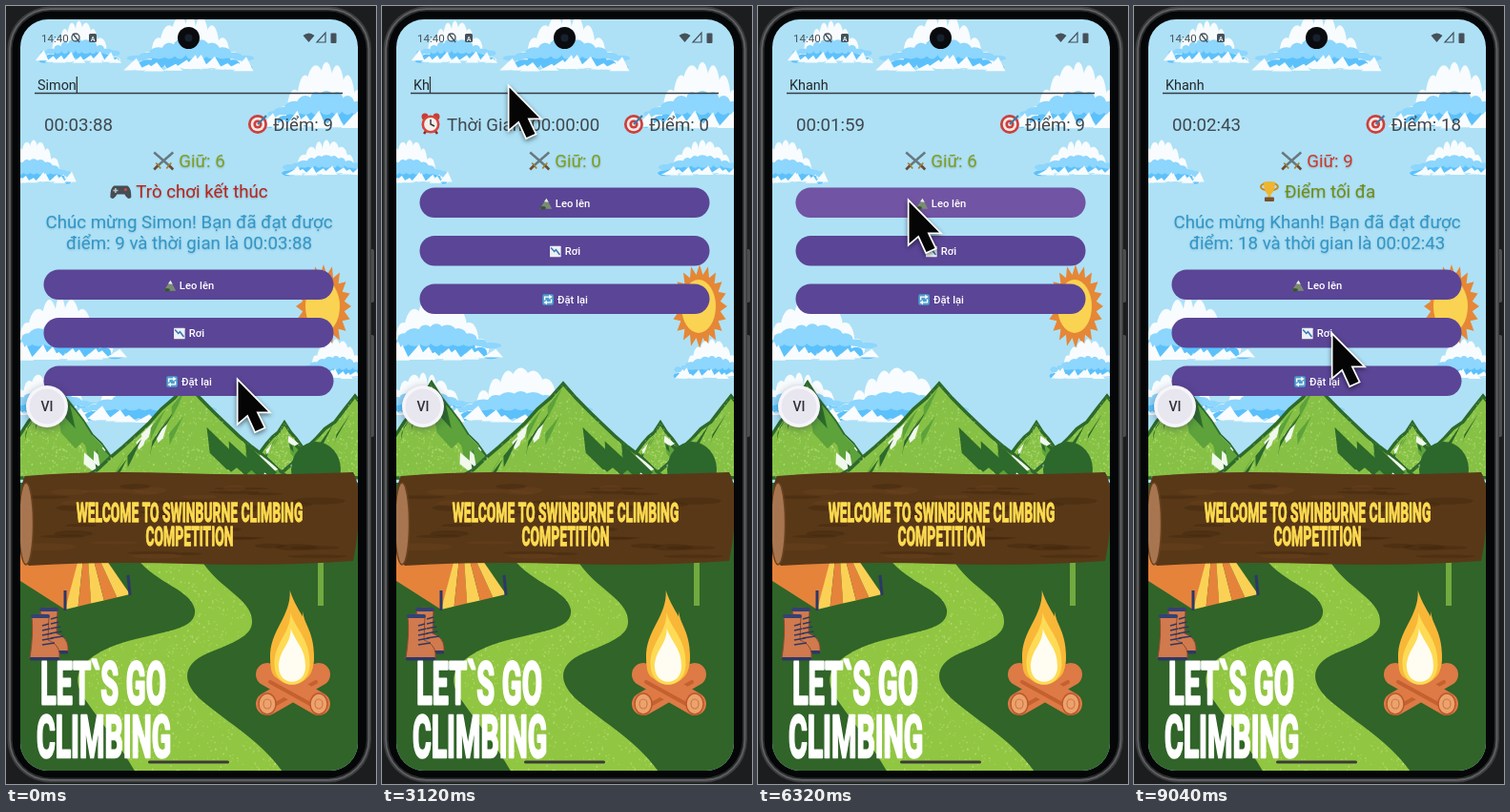
An HTML page with a canvas for the animation above (9120 ms loop, 388x816 px).

```html
<!DOCTYPE html>
<html lang="vi">
<head>
<meta charset="utf-8">
<title>Climbing score</title>
<style>
html, body { margin: 0; width: 100%; height: 100%; overflow: hidden; background: #1c1d1f; }
canvas { display: block; width: 388px; height: 816px; }
</style>
</head>
<body>
<canvas id="stage"></canvas>
<script>
const W = 388, H = 816, LOOP = 9120, STEP = 80;
const RESET = 320, START = 4720, CLICK = 305, HOLDS = 9, DONE = START + CLICK * (HOLDS - 1);
const OLIVE = '#7f9f20', BLUE = '#3294cf', RED = '#cf382c', GREY = '#40484e', PURPLE = '#5b4596';
const TYPE_FROM = 2880, TYPE_GAP = 130;
const FIRST = 'Simon', SECOND = 'Khanh';
const TAU = Math.PI * 2;
const dpr = window.devicePixelRatio || 1;
let g;

function makeLayer(canvas) {
  canvas.width = W * dpr;
  canvas.height = H * dpr;
  const ctx = canvas.getContext('2d');
  ctx.scale(dpr, dpr);
  return ctx;
}

// ---------- drawing helpers ----------
const mix = (a, b, u) => a + (b - a) * u;
function paint(path, fill, stroke, width = 2) {
  if (fill) { g.fillStyle = fill; g.fill(path); }
  if (stroke) { g.strokeStyle = stroke; g.lineWidth = width; g.stroke(path); }
  return path;
}
function trace(pts, closed) {
  const p = new Path2D();
  for (let i = 0; i < pts.length; i += 2) p.lineTo(pts[i], pts[i + 1]);
  if (closed) p.closePath();
  return p;
}
const poly = (pts, fill, stroke, width) => paint(trace(pts, true), fill, stroke, width);
const line = (pts, color, width) => paint(trace(pts), null, color, width);
const shape = (d, fill, stroke, width) => paint(new Path2D(d), fill, stroke, width);
function oval(x, y, rx, ry, fill, stroke, width) {
  const p = new Path2D();
  p.ellipse(x, y, rx, ry, 0, 0, TAU);
  paint(p, fill, stroke, width);
}
function box(x, y, w, h, r, fill) {
  const p = new Path2D();
  p.roundRect(x, y, w, h, r);
  paint(p, fill);
}
function text(s, x, y, size, color, align = 'left', weight = 400) {
  g.font = `${weight} ${size}px Roboto, sans-serif`;
  g.textAlign = align;
  g.fillStyle = color;
  g.fillText(s, x, y);
}
function glow(color, blur, dy) {
  g.shadowColor = color;
  g.shadowBlur = blur * dpr;
  g.shadowOffsetY = dy * dpr;
}
function at(x, y, scale, draw) {
  g.save();
  g.translate(x, y);
  g.scale(scale, scale);
  draw();
  g.restore();
}
function seeded(seed) {
  return () => (seed = (seed * 16807) % 2147483647) / 2147483647;
}
function chalk(path, x, y, w, h, count) {
  const rnd = seeded(91);
  g.save();
  g.clip(path);
  g.fillStyle = 'rgba(222,244,165,.38)';
  for (let i = 0; i < count; i++) g.fillRect(x + rnd() * w, y + rnd() * h, 0.6 + rnd() * 1.2, 0.6 + rnd() * 1.6);
  g.restore();
}

// ---------- scenery ----------
// A tapered dome of puffs with a blue belly and a ragged white hem.
function cloud(x, y, w, h) {
  const rnd = seeded(Math.round(x * 31 + y * 7 + 5000)), n = 11;
  const rise = u => Math.pow(Math.sin(Math.PI * u), 1.3);
  const row = (lift, size, color) => {
    for (let i = 0; i < n; i++) {
      const u = (i + .5) / n, top = h * rise(u) * size;
      oval(x + u * w, y + h * lift - top / 2, w * (.05 + .04 * rnd()), Math.max(3, top / 2), color);
    }
  };
  row(.96, .95, '#f8fcfe');
  row(.95, .5, '#5cc1fb');
  row(.78, .35, '#8dd6fd');
  for (let i = 0; i < n; i++) {
    const u = (i + rnd()) / n, px = x + u * w, py = y + h * (.93 + .07 * rnd());
    poly([px - w * .09, py, px + w * .02, py - h * (.1 + .16 * rnd()), px + w * .08, py], '#f8fcfe');
  }
}

function sun() {
  const pts = [], n = 40;
  for (let i = 0; i < n; i++) {
    const a = i * TAU / n, k = i % 2 ? 0.76 : 1;
    pts.push(333 + Math.cos(a) * 29 * k, 315 + Math.sin(a) * 44 * k);
  }
  poly(pts, '#e58736');
  oval(332, 315, 18, 28, '#fad352');
}

// Jagged slopes, then shadow, grass and snow wedges fanning down from the ridge.
function mountain(x, y, half, base, seed) {
  const rnd = seeded(seed), drop = base - y, pts = [];
  const ridge = u => y + drop * Math.pow(Math.abs(u), .92);
  for (let u = -1; u <= 1.01; u += .125) pts.push(x + u * half, ridge(u) + (Math.abs(u) > .1 ? rnd() * 5 - 2 : 0));
  const slope = poly(pts, '#86c145', '#2d6a2b', 3.5);
  chalk(slope, x - half, y, half * 2, drop, 700);
  g.save();
  g.clip(slope);
  const colors = ['#2d6a2b', '#5da23b', '#2d6a2b', '#f0f9ec'];
  for (let i = 0; i < 22; i++) {
    const u = rnd() * 1.7 - .85, snow = i % 4 === 3;
    const px = x + u * half, py = ridge(u) + rnd() * drop * .3;
    const len = drop * (snow ? .2 : .3 + .25 * rnd()), lean = Math.sign(u) * len * .6, wide = half * .07;
    poly([px, py, px + lean + wide, py + len * .75, px + lean * .8, py + len, px + lean * .4 - wide, py + len * .6], colors[i % 4]);
  }
  g.restore();
}

function ground() {
  g.fillStyle = '#306429';
  g.fillRect(15, 500, 355, 310);
  const trail = shape('M138 580C158 606 194 612 198 633C201 657 158 655 113 671C74 687 67 706 84 729C104 757 121 777 137 806H292C270 773 236 754 206 729C184 710 184 691 211 679C238 668 258 661 258 646C259 622 222 611 204 580Z', '#91c642');
  chalk(trail, 60, 580, 240, 226, 1300);
  oval(325, 486, 26, 29, '#2c672c');
  line([330, 560, 330, 629], '#71aa3e', 6);
}

function tent() {
  const n = 5, foot = u => [mix(62, 130, u), mix(633, 617, u)];
  poly([15, 570, 84, 560, 62, 633, 15, 603], '#e5833b');
  for (let i = 0; i < n; i++) poly([84, 550, ...foot(i / n), ...foot((i + 1) / n)], i % 2 ? '#e5833b' : '#fbd155');
  for (const u of [0, 1]) {
    const [x, y] = foot(u);
    line([x - 2 * u, y - 20, x, y + 1], '#2c3868', 3);
  }
}

function boot(x, y) {
  at(x, y, 1, () => {
    shape('M2 2Q10 -2 20 2L19 27Q30 31 31 41V46H0Q4 20 2 2Z', '#d07a4e', '#8f492f', 1);
    box(0, 45, 31, 3.5, 1, '#2d3865');
    box(1, 0, 20, 4, 2, '#344174');
    for (let i = 0; i < 5; i++) line([13, 12 + i * 5, 20 + i * 1.5, 10 + i * 5], '#2d3865', 1.4);
  });
}

function flame(x, base, w, h, color) {
  const X = k => x + w * k, Y = k => base - h * k;
  const p = new Path2D();
  p.moveTo(X(-.05), Y(1));
  p.bezierCurveTo(X(.12), Y(.75), X(.52), Y(.62), X(.5), Y(.28));
  p.bezierCurveTo(X(.48), Y(-.09), X(-.48), Y(-.09), X(-.5), Y(.28));
  p.bezierCurveTo(X(-.52), Y(.58), X(-.02), Y(.72), X(-.05), Y(1));
  paint(p, color);
}

function campfire() {
  for (const s of [1, -1]) {
    const x = 301 - s * 27;
    g.lineCap = 'round';
    line([x, 732, 301 + s * 27, 701], '#dd7a45', 24);
    line([x, 737, 301 + s * 24, 709], '#c4612f', 4);
    g.lineCap = 'butt';
    oval(x, 732, 9, 11, '#eda26c', '#bb572d', 1.5);
    oval(x, 732, 4, 5, null, '#c97949', 1.2);
  }
  for (const s of [1, -1]) flame(300 + s * 12, 706, 21, 62 + s * 9, '#f9b738');
  flame(300, 712, 46, 99, '#f9b738');
  flame(300, 712, 37, 76, '#fddb55');
  flame(300, 709, 28, 56, '#fffdf2');
}

// Narrow poster lettering: one fixed proportion and weight for the whole style.
function poster(s, x, y, size, color, align) {
  g.save();
  g.translate(x, y);
  g.scale(0.495, 1);
  text(s, 0, 0, size, color, align, 700);
  g.lineJoin = 'round';
  g.strokeStyle = color;
  g.lineWidth = size * .045;
  g.strokeText(s, 0, 0);
  g.restore();
}

function sign() {
  shape('M20 493Q90 487 180 490T364 489Q371 500 370 530T364 582Q280 588 190 585T24 587Q14 578 14 540T20 493Z', '#593817');
  const rnd = seeded(37);
  for (let i = 0; i < 40; i++) {
    const x = 40 + rnd() * 290, y = 498 + rnd() * 80;
    oval(x, y, 12 + rnd() * 22, 1 + rnd() * 3, i % 3 ? 'rgba(62,35,12,.4)' : 'rgba(112,72,34,.3)');
  }
  oval(21, 543, 7.5, 43, '#a77650', '#6b431f', 1.5);
  poster('WELCOME TO SWINBURNE CLIMBING', 192.5, 541, 28, '#ffdc50', 'center');
  poster('COMPETITION', 192.5, 566, 28, '#ffdc50', 'center');
}

function statusBar() {
  const c = '#46515a';
  text('14:40', 37, 37.5, 11.5, c);
  oval(73, 33, 4, 4, null, c, 1.3);
  line([70, 29, 77, 38], c, 1.4);
  box(87, 29, 8, 9, 1.5, c);
  text('A', 91, 36.5, 7, '#d5eef8', 'center', 700);
  shape('M311.5 31Q317.5 26 323.5 31L317.5 38Z', c);
  poly([326, 38, 335, 38, 335, 28], null, c, 1.2);
  box(340.5, 28.5, 6, 10.5, 1, c);
  oval(191.5, 33.5, 11.5, 11.5, '#090b0e');
  oval(191.5, 33.5, 4, 4, '#17212d');
}

function phone() {
  g.fillStyle = '#1c1d1f';
  g.fillRect(0, 0, W, H);
  box(381, 255, 5, 56, 2, '#4c4d4e');
  box(381, 345, 5, 107, 2, '#4c4d4e');
  ['#3d3e3f', '#626364', '#2c2d2e', '#050607'].forEach((c, i) => {
    const d = i * 1.7;
    box(1.5 + d, .5 + d, 381.5 - d * 2, 814 - d * 2, 45 - d, c);
  });
}

function scenery() {
  phone();
  g.save();
  g.beginPath();
  g.roundRect(15, 14, 354, 788, 29);
  g.clip();
  g.fillStyle = '#aee1f6';
  g.fillRect(15, 14, 354, 788);
  cloud(36, 15, 81, 45);
  cloud(132, 8, 123, 61);
  cloud(275, 58, 122, 72);
  cloud(-10, 140, 78, 47);
  cloud(293, 140, 86, 38);
  cloud(-6, 304, 126, 68);
  sun();
  cloud(307, 349, 78, 42);
  cloud(-8, 384, 102, 45);
  cloud(74, 379, 143, 58);
  mountain(52, 395, 76, 496, 11);
  mountain(292, 437, 50, 496, 23);
  mountain(366, 409, 84, 496, 42);
  mountain(190, 396, 108, 496, 67);
  ground();
  tent();
  boot(34, 631);
  boot(25, 638);
  campfire();
  sign();
  poster('LET`S GO', 36, 732, 62, '#fff', 'left');
  poster('CLIMBING', 32, 788, 61, '#fff', 'left');
  statusBar();
  box(149, 791.5, 85, 3, 1.5, '#3b3b36');
  g.restore();
}

// ---------- icons, centred on the origin, about 22 wide ----------
const icons = {
  clock() {
    for (const s of [-1, 1]) {
      oval(6 * s, -8, 3.5, 3.5, '#c83d36');
      line([7 * s, 10, 4 * s, 6], '#8b2b28', 2.5);
    }
    oval(0, 0, 8.2, 8.2, '#f4f1ec', '#d6463c', 2.6);
    line([0, -5, 0, 0, 4, 2], '#333', 1.4);
  },
  target() {
    for (let i = 0; i < 4; i++) oval(0, 0, 10 - i * 2.7, 10 - i * 2.7, i % 2 ? '#f4e8e4' : '#cc3f3c');
    line([0, 0, 9, -9], '#3f7ba8', 2.2);
  },
  swords() {
    for (const s of [-1, 1]) {
      line([-10 * s, -9, 6 * s, 5], '#68777e', 2.4);
      line([3 * s, 8, 8 * s, 2], '#a4822e', 1.8);
      line([6 * s, 5, 10 * s, 9], '#6d4c35', 2.6);
    }
  },
  gamepad() {
    shape('M-7 -6H7Q11 -4 11 6Q8 10 4 3H-4Q-8 10 -11 6Q-11 -4 -7 -6Z', '#464d53');
    line([-8, -1, -3, -1], '#b5bfc4', 1.6);
    line([-5.5, -3.5, -5.5, 1.5], '#b5bfc4', 1.6);
    oval(5, -2, 1.5, 1.5, '#cf4a42');
  },
  trophy() {
    oval(0, -5, 9, 4, null, '#c78b1e', 2);
    shape('M-6 -10H6Q6 0 1.5 3V6H-1.5V3Q-6 0 -6 -10Z', '#efb52e');
    box(-5, 6, 10, 4.5, 1, '#79502d');
  },
  climber() {
    poly([-3, -10, 4, -10, 6, 10, -8, 10], '#a7a9a8');
    line([1, -5, -2, 3, 2, 9], '#6f8c98', 3);
  },
  peak() {
    poly([-11, 10, 1, -9, 11, 10], '#7b8b72');
    poly([-3, -3, 1, -9, 5, -2], '#e7edef');
    oval(-5, 8, 5, 3, '#34582f');
  },
  chart() {
    box(-10, -10, 20, 20, 1, '#edf1f3');
    line([-8, -7, -2, 0, 1, -3, 8, 6], '#3979b6', 2.6);
  },
  reset() {
    box(-10, -10, 20, 20, 3, '#4c9fcd');
    for (const turn of [0, Math.PI]) {
      g.save();
      g.rotate(turn);
      shape('M-6 1V-5H3', null, '#fff', 2.4);
      poly([2, -9, 8, -5, 2, -1], '#fff');
      g.restore();
    }
  }
};
const icon = (name, x, y, scale = 1) => at(x, y, scale, icons[name]);

// ---------- app state ----------
const two = n => String(n).padStart(2, '0');
function clock(cs) {
  return `${two(Math.floor(cs / 6000))}:${two(Math.floor(cs / 100) % 60)}:${two(cs % 100)}`;
}
// Holds 1 to 3 give one point each, 4 to 6 two, 7 to 9 three.
function points(hold) {
  let sum = 0;
  for (let i = 1; i <= hold; i++) sum += Math.ceil(i / 3);
  return sum;
}

function stateAt(t) {
  if (t < RESET) return { name: FIRST, hold: 6, cs: 388, score: 9, running: true, over: 'fall' };
  const running = t >= START;
  const hold = running ? Math.min(HOLDS, 1 + Math.floor((t - START) / CLICK)) : 0;
  const typed = Math.max(0, 1 + Math.floor((t - TYPE_FROM) / TYPE_GAP));
  return {
    name: SECOND.slice(0, typed),
    hold, running,
    score: points(hold),
    cs: running ? Math.floor((Math.min(t, DONE) - START + 10) * .0993) : 0,
    over: t >= DONE ? 'top' : ''
  };
}

const MOVES = [
  [500, 960, 186, 248],
  [960, 1460, 132, 82],
  [3560, 4320, 157, 202],
  [7720, 8480, 207, 342]
];
function pointerAt(t) {
  let x = 242, y = 390;
  for (const [from, to, nx, ny] of MOVES) {
    const u = Math.min(1, Math.max(0, (t - from) / (to - from)));
    const e = u * u * (3 - 2 * u);
    x = mix(x, nx, e);
    y = mix(y, ny, e);
  }
  return [x, y];
}

// ---------- app drawing ----------
function field(s, t) {
  if (!s.name) {
    g.globalAlpha = .75;
    icon('climber', 40, 82, .78);
    g.globalAlpha = 1;
    text('Nhập tên vận động viên', 54, 87.5, 14.4, '#7f929c');
  }
  text(s.name, 33, 87.5, 14.4, '#24292d');
  line([30, 91.5, 353, 91.5], '#343d43', 1.6);
  const lastKey = TYPE_FROM + TYPE_GAP * (SECOND.length - 1);
  const phase = t < lastKey ? t : t - lastKey;
  const x = 33.5 + g.measureText(s.name).width;
  if (phase % 1000 < 500) line([x, 74, x, 91], '#333', 1.3);
}

function iconLine(name, label, y, color) {
  g.font = '400 18.7px Roboto, sans-serif';
  const left = 192 - (g.measureText(label).width + 27) / 2;
  icon(name, left + 11, y - 6.5);
  glow('rgba(50,60,40,.3)', 2, 1);
  text(label, left + 27, y, 18.7, color);
  glow('transparent', 0, 0);
}

function scores(s) {
  if (s.running) text(clock(s.cs), 40, 131, 18.7, GREY);
  else {
    icon('clock', 51, 124);
    text('Thời Gian: ' + clock(0), 68, 131, 18.7, GREY);
  }
  const label = 'Điểm: ' + s.score;
  text(label, 343, 131, 18.7, GREY, 'right');
  icon('target', 343 - g.measureText(label).width - 16, 124);
  const color = s.hold > 6 ? RED : s.hold > 3 || !s.hold ? OLIVE : BLUE;
  iconLine('swords', 'Giữ: ' + s.hold, 169, color);
}

function message(s) {
  if (s.over === 'fall') iconLine('gamepad', 'Trò chơi kết thúc', 201, '#b92420');
  else iconLine('trophy', 'Điểm tối đa', 201, '#718d12');
  glow('rgba(40,80,110,.25)', 2, 1);
  text(`Chúc mừng ${s.name}! Bạn đã đạt được`, 192, 233, 18.7, '#3097c8', 'center');
  text(`điểm: ${s.score} và thời gian là ${clock(s.cs)}`, 192, 255, 18.7, '#3097c8', 'center');
  glow('transparent', 0, 0);
}

function button(y, name, label, press) {
  box(39.5, y, 304, 31.5, 15.75, PURPLE);
  if (press) box(39.5, y, 304, 31.5, 15.75, `rgba(205,145,215,${press})`);
  g.font = '500 11.2px Roboto, sans-serif';
  const left = 192 - (g.measureText(label).width - 16) / 2;
  icon(name, left - 10, y + 16.5, .58);
  text(label, left, y + 20, 11.2, '#fff', 'left', 500);
}

function buttons(s, t) {
  const y = s.over ? 276.5 : 190.5;
  const climbing = t >= START && t < DONE + CLICK;
  button(y, 'peak', 'Leo lên', climbing ? .22 - .1 * ((t - START) % CLICK) / CLICK : 0);
  button(y + 50.5, 'chart', 'Rơi', 0);
  button(y + 101, 'reset', 'Đặt lại', t >= RESET - 80 && t < RESET + 160 ? .2 : 0);
}

function badge() {
  glow('rgba(30,40,70,.4)', 8, 2);
  oval(43, 420, 22, 22, '#f6f5fa');
  glow('transparent', 0, 0);
  oval(43, 420, 18.5, 18.5, '#e8e6ef');
  text('VI', 43, 425, 14, '#30313a', 'center', 500);
}

function pointer(x, y) {
  at(x, y, 1, () => {
    glow('rgba(0,0,0,.4)', 5, 2);
    const d = 'M1.5 3.5V47L11.5 38.5 19.5 56 28.5 52 20.5 35.5H33Z';
    shape(d, '#fff', '#fff', 3.4);
    glow('transparent', 0, 0);
    shape(d, '#050505');
  });
}

const backdrop = document.createElement('canvas');
g = makeLayer(backdrop);
scenery();
g = makeLayer(document.getElementById('stage'));

const began = performance.now();
function draw() {
  const t = Math.floor((performance.now() - began) / STEP) * STEP % LOOP;
  const s = stateAt(t);
  g.drawImage(backdrop, 0, 0, W, H);
  field(s, t);
  scores(s);
  if (s.over) message(s);
  buttons(s, t);
  badge();
  pointer(...pointerAt(t));
  requestAnimationFrame(draw);
}
draw();
</script>
</body>
</html>
```
